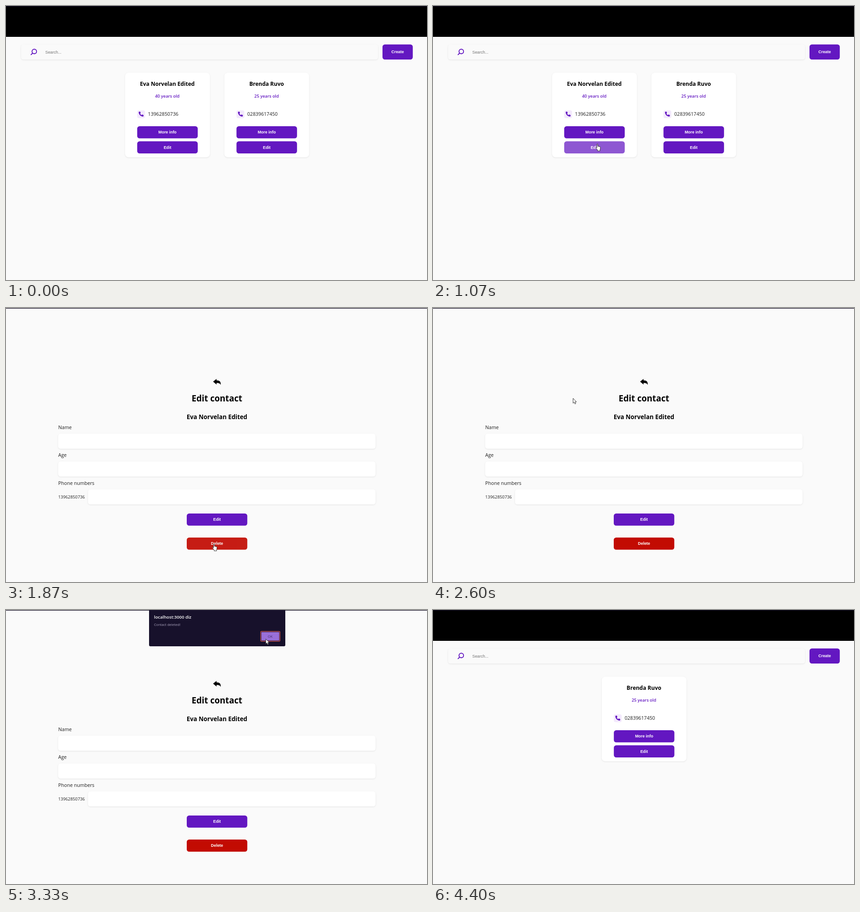
Write an HTML page that moves like this. It is 927 by 604 pixels and loops after 4.47 s.

```html
<!DOCTYPE html>
<html lang="en">
<head>
<meta charset="utf-8">
<title>Contacts</title>
<style>
  html, body { margin: 0; width: 100%; height: 100%; overflow: hidden; background: #fafafa; }
  svg { display: block; }
  text { font: 400 10.667px "Open Sans", sans-serif; fill: #212121; }
  .mid { text-anchor: middle; }
  .title { font-weight: 700; font-size: 12px; fill: #000; }
  .age { font-weight: 600; font-size: 9.333px; fill: #6317c1; }
  .small { font-size: 9.333px; }
  .label { font: 700 8.889px "Liberation Sans", Arial, sans-serif; fill: #fff; }
  .hint { font: 400 8.889px "Liberation Sans", Arial, sans-serif; fill: #757575; }
  .raised { filter: drop-shadow(0 1.3px 1.6px rgba(0, 0, 0, .09)); }
</style>
</head>
<body>
<svg id="stage" width="927" height="604" viewBox="0 0 927 604"></svg>
<script>
const PURPLE = '#6317c1', RED = '#c20b02';
const STEP = 4470 / 67;
const first = { name: 'Eva Norvelan Edited', age: 40, phone: '13962850736' };
const second = { name: 'Brenda Ruvo', age: 25, phone: '02839617450' };

const text = (x, y, cls, content, extra = '') =>
  `<text x="${x}" y="${y}" class="${cls}" ${extra}>${content}</text>`;
const box = (x, y, w, h, fill, r = 5.3, cls = '') =>
  `<rect x="${x}" y="${y}" width="${w}" height="${h}" rx="${r}" fill="${fill}" class="${cls}"/>`;
const button = (x, y, label, fill = PURPLE, id = '', w = 133.3, h = 26.7) =>
  `<g id="${id}">${box(x, y, w, h, fill)}${text(x + w / 2, y + h / 2 + 3.1, 'label mid', label)}</g>`;
const field = (x, y) => box(x, y, 813.7 - x, 33.3, '#fff', 5.3, 'raised');

const card = (id, x, person, editId = '') => `<g id="${id}" transform="translate(${x} 0)">
  ${box(0, 147, 186.7, 186.5, '#fff', 8, 'raised')}
  ${text(93, 175.6, 'title mid', person.name)}
  ${text(93, 202.3, 'age mid', person.age + ' years old')}
  ${box(26.7, 230, 17.3, 17.3, '#f3e9fc', 4)}
  <path transform="translate(29.4 232.6)" fill="${PURPLE}" d="M.6 1.5Q.6.8 1.3.6L3.1.2Q3.7.1 4 .7L4.9 2.9Q5 3.4 4.6 3.8L3.6 4.7Q4.7 6.9 6.9 8L7.8 6.9Q8.2 6.5 8.7 6.7L10.9 7.7Q11.5 8 11.4 8.6L11 10.4Q10.8 11.1 10.1 11.1C4.8 11.1.6 6.8.6 1.5Z"/>
  ${text(50.4, 242.4, '', person.phone)}
  ${button(26.7, 265, 'More info')}
  ${button(26.7, 298.3, 'Edit', PURPLE, editId)}
</g>`;

const listPage = `<g id="list">
  ${box(0, 0, 927, 68, '#000', 0)}
  ${box(33.3, 84.7, 785.7, 33.3, '#fafafa', 5.3, 'raised')}
  <g fill="none" stroke="${PURPLE}" stroke-width="1.9" stroke-linecap="round">
    <circle cx="62.3" cy="100.2" r="5"/><path d="M58.6 104L55.2 107.3"/>
  </g>
  ${text(86.5, 104.5, 'hint', 'Search...')}
  ${button(829, 84.7, 'Create', PURPLE, '', 66.7, 33.3)}
  ${card('left', 262.2, first, 'cardEdit')}
  ${card('right', 480.8, second)}
</g>`;

const editPage = `<g id="edit">
  <path d="M456 162.3L463.6 156.2V159.6C470.2 159.7 473.6 162.4 472.6 169.5C471.3 166 468.6 165.1 463.6 165.2V168.8Z"/>
  ${text(464.5, 205.7, 'title mid', 'Edit contact', 'style="font-size:18.667px"')}
  ${text(464.5, 245, 'title mid', first.name, 'style="font-size:13.333px"')}
  ${text(115, 267.2, '', 'Name')}${field(115, 277)}
  ${text(115, 328.3, '', 'Age')}${field(115, 338.3)}
  ${text(115, 389.6, '', 'Phone numbers')}${field(180.7, 399.8)}
  ${text(115, 420.3, 'small', first.phone)}
  ${button(398, 453, 'Edit')}
  ${button(398, 506, 'Delete', RED, 'remove')}
</g>`;

const dialog = `<g id="dialog">
  ${box(315, -5, 300, 85, '#17112b', 3)}
  ${text(326, 18.5, '', 'localhost:3000 diz', 'style="font-size:9.6px;font-weight:600;fill:#fff"')}
  ${text(326, 34.6, '', 'Contact deleted!', 'style="font-size:7.6px;fill:#aaa3bd"')}
  <rect x="560.7" y="47.2" width="42.6" height="21.6" rx="2" fill="none" stroke="#c2504f" stroke-width="1.4"/>
  <rect id="ok" x="562.3" y="48.8" width="39.4" height="18.4" rx="1"/>
  ${text(581.7, 60.7, 'mid', 'OK', 'style="font-size:8px;fill:#493070"')}
</g>`;

const pointer = `<g id="pointer" fill="#fff" stroke="#222" stroke-width=".9" stroke-linejoin="round">
  <path id="arrow" d="M.4.5V11.3L2.8 9.2L4.6 13L6.4 12.2L4.7 8.5H8Z"/>
  <path id="hand" transform="translate(-4 0)" d="M3 1.5C3 .1 5 .1 5 1.5V5.6L9 6.6Q10.9 7 10.7 8.9L9.8 13.2V15.9H4.2V13.8L.9 9.7Q.1 8.2 1.6 8L3 9.2Z"/>
</g>`;

const stage = document.getElementById('stage');
stage.innerHTML = box(0, 0, 927, 604, '#fafafa', 0) + listPage + editPage +
  box(0, 0, 927, 1.2, '#110c22', 0) + dialog + pointer;
const $ = id => document.getElementById(id);

// Pointer tip: [step, x, y]
const path = [
  [4, 221, 114], [6, 265, 178], [8, 335, 275], [9, 352, 299], [11, 361, 301],
  [12, 362, 302], [14, 362, 302], [16, 362, 303.5], [20, 362, 303.5],
  [23, 405, 395], [26, 455, 501], [27, 457, 512], [28, 458, 519.5], [30, 458, 520.5],
  [35, 458, 520.5], [36, 440, 470], [37, 400, 375], [38, 345, 270], [39, 308, 198.5],
  [41, 260, 140], [42, 330, 120], [43, 460, 109], [47, 545, 75], [50, 585, 57.5],
  [55, 585, 57.5], [56, 610, 85], [57, 680, 180], [58, 758, 289],
  [60, 768, 325], [63, 725, 366], [65, 688, 487]
];

function tipAt(step) {
  const i = path.findIndex(key => key[0] >= step);
  if (i <= 0) return path[0].slice(1);
  const [s0, x0, y0] = path[i - 1], [s1, x1, y1] = path[i];
  const k = (step - s0) / (s1 - s0);
  return [x0 + (x1 - x0) * k, y0 + (y1 - y0) * k];
}

const within = (step, from, to) => step >= from && step < to;
const show = (id, on) => $(id).setAttribute('display', on ? 'inline' : 'none');
const ramp = (step, from, to) => {
  const k = Math.min(1, Math.max(0, (step - from) / (to - from)));
  return k * k * (3 - 2 * k);
};
const fade = amount => 1 - .28 * amount;

function draw(time) {
  const step = Math.floor((time % 4470 + 3.5) / STEP) % 67;
  const editing = within(step, 19, 61);
  const hand = within(step, 9, 19) || within(step, 27, 36);

  show('list', !editing);
  show('edit', editing);
  show('left', step < 19);
  $('right').setAttribute('transform', `translate(${step < 19 ? 480.8 : 371.5} 0)`);
  $('cardEdit').setAttribute('opacity', fade(ramp(step, 8, 11)));
  $('remove').setAttribute('opacity', fade(ramp(step, 27, 30) - ramp(step, 35, 38)));

  show('dialog', within(step, 41, 52));
  $('ok').setAttribute('fill', step >= 49 ? '#996fd8' : '#7d4fc7');

  show('pointer', within(step, 4, 66));
  show('hand', hand);
  show('arrow', !hand);
  $('pointer').setAttribute('transform', `translate(${tipAt(Math.min(step, 65))})`);
}

function tick() {
  draw(performance.now());
  requestAnimationFrame(tick);
}
tick();
</script>
</body>
</html>
```
